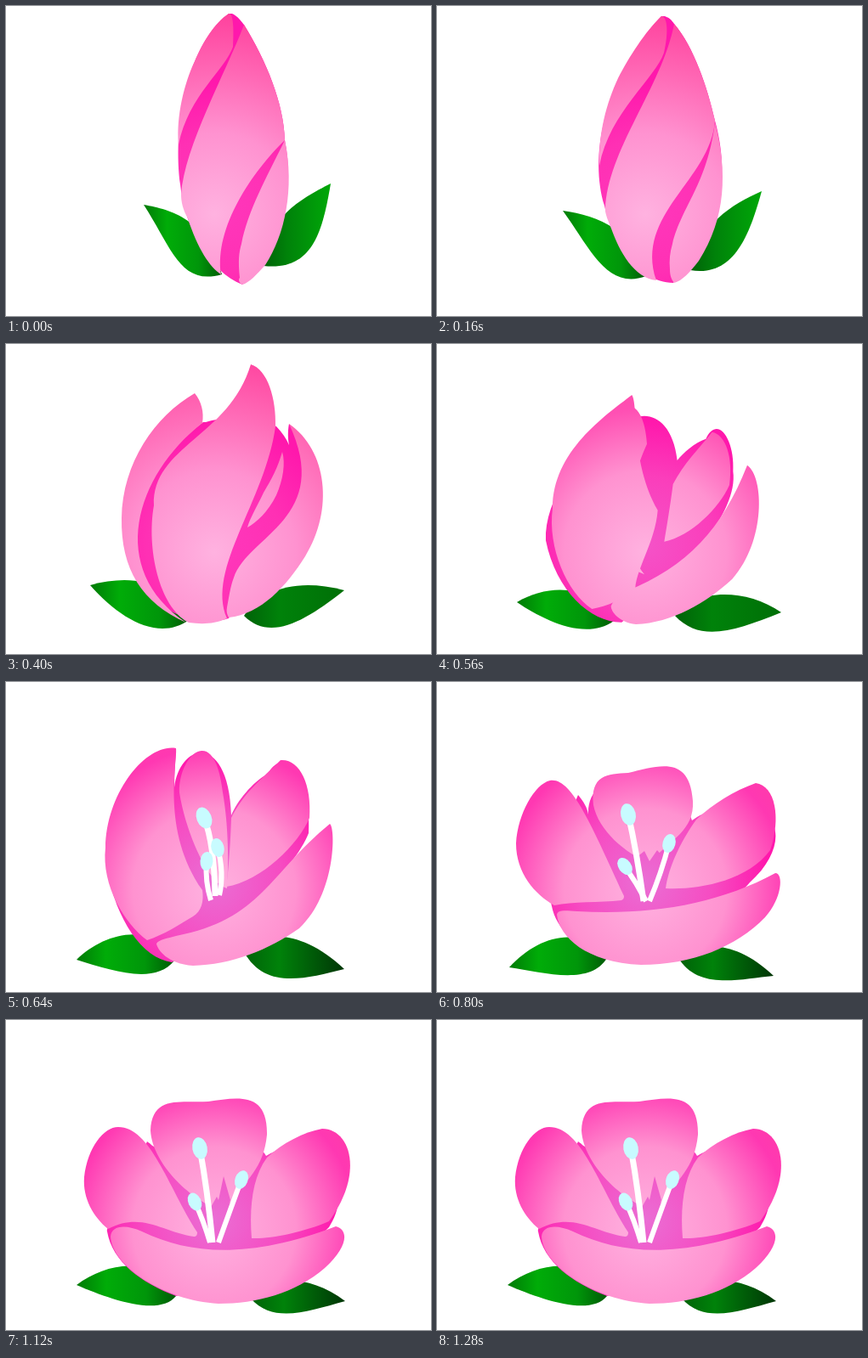
Recreate the animation shown at these times as an HTML page without scripts. Size 500 by 365 pixels, loop 1.44 s.

```html
<!DOCTYPE html>
<html lang="en">
<head>
<meta charset="utf-8">
<title>Blooming flower</title>
<style>
html, body { margin: 0; width: 100%; height: 100%; overflow: hidden; background: #fff; }
svg { display: block; width: 100vw; height: 100vh; }

/* Poses are joined by steps of 80 ms: two per segment unless a keyframe says otherwise. */
path, stop, #stamens { animation: 1.44s steps(2) infinite; }
.stem { fill: none; stroke: #fff; stroke-width: 6; marker-start: url(#head); }
.petal { fill: url(#pink); }
.dark { fill: url(#magenta); }
.tint { animation-name: tint; }
.glow { animation-name: glow; }
.halo { animation-name: halo; }
.shade { animation-name: shade; }
#leafL { animation-name: leafL; fill: url(#greenL); }
#leafR { animation-name: leafR; fill: url(#greenR); }
#base { animation-name: base; }
#back { animation-name: back; }
#right { animation-name: right; }
#crown { animation-name: crown; }
#stamens { animation-name: reveal; }
#stemA { animation-name: stemA; stroke-width: 7; }
#stemB { animation-name: stemB; }
#stemC { animation-name: stemC; }
#left { animation-name: left; }
#front { animation-name: front; }

@keyframes tint {
  0%, 27.77% { stop-color: #ff68b5; }
  44.44%, 100% { stop-color: #ff38b2; }
}
@keyframes glow {
  0%, 27.77% { stop-color: #ff38bc; }
  44.44%, 100% { stop-color: #ea6ed4; }
}
@keyframes halo {
  0%, 27.77% { stop-color: #ff30b4; }
  44.44%, 100% { stop-color: #f64cc2; }
}
@keyframes shade {
  0%, 11.11% { stop-color: #00a808; }
  44.44%, 100% { stop-color: #003606; }
}
@keyframes reveal {
  0%, 44.43% { opacity: 0; }
  44.44%, 100% { opacity: 1; }
}
@keyframes leafL {
  0% { d: path("M162 234C195 240 235 250 254 316C205 330 195 285 162 234Z"); }
  11.11% { d: path("M148 241C190 247 235 265 246 318C200 335 180 285 148 241Z"); animation-timing-function: steps(3); }
  27.77% { d: path("M99 284C150 270 195 280 215 325C180 350 135 325 99 284Z"); }
  38.88% { d: path("M94 304C135 280 185 285 208 326C175 350 125 325 94 304Z"); animation-timing-function: steps(1); }
  44.44% { d: path("M83 327C115 295 175 280 198 328C175 357 125 340 83 327Z"); }
  55.55% { d: path("M85 336C120 298 170 285 200 325C180 358 125 342 85 336Z"); }
  66.66% { d: path("M85 329C120 295 170 283 200 327C180 354 125 338 85 329Z"); }
  77.77%, 100% { d: path("M83 312C120 285 175 275 200 325C180 350 120 328 83 312Z"); }
}
@keyframes leafR {
  0% { d: path("M382 209C345 228 305 250 303 306C360 312 372 268 382 209Z"); }
  11.11% { d: path("M382 218C345 235 310 255 298 311C350 320 368 268 382 218Z"); animation-timing-function: steps(3); }
  27.77% { d: path("M398 290C340 275 300 290 280 320C310 350 350 328 398 290Z"); }
  38.88% { d: path("M405 316C360 285 300 290 280 320C310 352 350 338 405 316Z"); animation-timing-function: steps(1); }
  44.44% { d: path("M398 338C350 292 300 290 280 318C305 362 350 350 398 338Z"); }
  55.55% { d: path("M396 346C350 302 305 305 286 328C310 362 355 350 396 346Z"); }
  66.66% { d: path("M397 344C350 298 305 300 288 328C310 362 355 350 397 344Z"); }
  77.77%, 100% { d: path("M399 331C355 298 305 300 288 328C315 358 355 343 399 331Z"); }
}
@keyframes base {
  0% { d: path("M262 9C263 9 264 9 265 9C266 9 267 9 268 10C272 12 277 18 280 22C306 64 327 115 328 158C340 215 325 285 278 328C240 313 210 262 205 210C197 150 209 50 262 9Z"); }
  11.11% { d: path("M264 12C265 12 266 12 267 12C268 12 269 12 270 13C274 14 277 18 279 21C302 48 318 95 327 135C345 200 336 270 278 326C235 326 204 270 197 235C180 180 193 90 264 12Z"); animation-timing-function: steps(3); }
  27.77% { d: path("M232 92C233 92 234 92 235 92C255 85 300 85 318 97C325 104 330 112 333 119C331 108 332 99 333 94C385 155 350 215 262 323C225 335 160 315 146 250C138 190 178 130 232 92Z"); animation-timing-function: steps(3); }
  44.44% { d: path("M200 79C199 95 198 110 198 124C205 70 262 60 265 157C272 140 290 118 308 108C330 70 360 120 356 178C340 220 260 300 195 330C160 325 130 280 119 222C120 180 160 130 200 79Z"); }
  55.55% { d: path("M166 133C172 140 177 148 178 156C176 90 285 110 300 163C308 157 316 154 325 150C405 130 420 190 368 236C340 270 250 310 200 325C165 315 140 290 135 264C128 240 150 170 166 133Z"); }
  66.66% { d: path("M167 149C168 150 170 151 171 152C185 165 290 125 315 163C320 160 325 159 330 158C390 150 425 200 370 254C340 290 250 320 200 325C160 310 125 285 120 250C140 225 150 180 167 149Z"); }
  77.77%, 100% { d: path("M166 143C167 144 169 145 170 146C185 165 285 120 306 160C312 156 320 153 328 150C380 130 410 200 380 244C340 285 250 315 200 325C160 310 125 285 119 249C118 240 150 180 166 143Z"); }
}
@keyframes back {
  0% { d: path("M262 9C268 8 268 30 267 48C258 75 215 105 203 163C200 130 210 90 222 65C232 42 245 20 262 9Z"); }
  11.11% { d: path("M264 12C272 12 272 35 267 55C257 85 203 125 191 188C190 150 199 115 213 85C226 60 245 30 264 12Z"); animation-timing-function: steps(3); }
  27.77% { d: path("M222 58C230 68 233 80 231 93C152 155 118 265 212 328C160 305 135 265 136 205C137 140 175 85 222 58Z"); animation-timing-function: steps(3); }
  44.44% { d: path("M230 81C245 80 252 105 255 130C262 170 262 215 260 243C235 235 210 170 204 130C203 108 215 82 230 81Z"); }
  55.55% { d: path("M225 107C260 99 297 85 301 140C303 175 275 185 250 213C222 202 190 175 184 145C180 110 200 108 225 107Z"); }
  66.66% { d: path("M225 115C262 108 312 80 316 140C315 180 280 185 250 217C215 205 172 175 169 145C168 110 195 117 225 115Z"); }
  77.77%, 100% { d: path("M238 96C270 92 308 82 307 135C303 175 285 185 256 225C220 215 172 170 170 130C172 88 205 98 238 96Z"); }
}
@keyframes right {
  0%, 11.11% { d: path("M300 170C302 180 298 195 290 200C285 205 283 207 278 210C285 200 290 190 292 188C296 180 298 175 300 170Z"); animation-timing-function: steps(3); }
  27.77% { d: path("M325 127C329 140 326 160 318 178C308 198 295 210 284 216C287 205 295 192 303 175C312 160 320 145 325 127Z"); animation-timing-function: steps(3); }
  44.44% { d: path("M323 92C345 90 360 120 357 160C345 190 300 235 259 241C262 220 264 190 265 160C280 130 300 115 323 92Z"); }
  55.55% { d: path("M375 119C398 122 405 160 392 198C365 235 305 245 269 243C272 220 285 190 305 162C325 143 350 128 375 119Z"); }
  66.66% { d: path("M368 147C420 149 435 195 380 243C345 250 285 250 270 238C268 215 290 190 315 164C333 153 350 147 368 147Z"); }
  77.77%, 100% { d: path("M372 128C405 128 422 180 380 237C350 250 310 258 289 257C286 220 290 185 307 162C325 145 350 132 372 128Z"); }
}
@keyframes crown {
  0%, 44.44% { d: path("M244 245L246 243L248 244L250 243L252 245L248 250Z"); }
  55.55% { d: path("M228 212L244 199L250 211L259 198L266 206L250 235Z"); }
  66.66% { d: path("M235 212L247 204L255 216L264 206L272 205L252 235Z"); }
  77.77%, 100% { d: path("M240 222L248 208L250 212L256 184L264 212L256 235Z"); }
}
@keyframes stemA {
  0%, 44.44% { d: path("M233 160Q245 190 246 252"); }
  55.55% { d: path("M225 156Q235 200 243 258"); }
  66.66% { d: path("M221 158Q232 200 245 258"); }
  77.77%, 100% { d: path("M228 151Q237 200 243 262"); }
}
@keyframes stemB {
  0%, 44.44% { d: path("M236 211Q234 235 241 257"); }
  55.55% { d: path("M221 217Q235 237 246 258"); }
  66.66% { d: path("M213 223Q232 240 244 258"); }
  77.77%, 100% { d: path("M222 214Q232 235 240 262"); }
}
@keyframes stemC {
  0%, 44.44% { d: path("M249 195Q257 225 251 251"); }
  55.55% { d: path("M273 190Q264 225 250 258"); }
  66.66% { d: path("M285 190Q265 220 251 258"); }
  77.77%, 100% { d: path("M277 188Q265 220 250 262"); }
}
@keyframes left {
  0% { d: path("M280 22C306 64 327 115 328 158C290 195 245 260 253 316C240 308 225 285 214 250C208 240 206 230 206 222C210 165 258 80 280 22Z"); }
  11.11% { d: path("M279 21C302 48 318 95 327 135C322 205 232 245 258 323C232 320 215 290 205 262C201 252 198 245 198 240C200 170 265 95 279 21Z"); animation-timing-function: steps(3); }
  27.77% { d: path("M288 24C308 30 318 65 317 97C305 185 235 265 260 323C245 330 230 330 215 328C180 310 165 240 174 190C172 120 262 110 288 24Z"); animation-timing-function: steps(3); }
  44.44% { d: path("M200 78C202 95 182 175 231 245C233 258 230 270 220 276C205 285 185 298 166 304C140 285 112 240 117 195C118 130 165 72 200 78Z"); }
  55.55% { d: path("M133 116C158 112 180 165 220 252C220 255 219 256 217 257C190 260 160 258 138 263C115 250 93 225 93 190C95 155 115 120 133 116Z"); }
  66.66% { d: path("M122 134C160 132 195 180 215 240C214 243 213 244 211 244C180 230 150 232 122 247C100 240 78 220 78 195C80 170 105 132 122 134Z"); }
  77.77%, 100% { d: path("M132 126C170 126 190 195 225 250C225 253 224 255 221 255C185 250 160 225 120 246C103 232 90 210 92 185C96 150 115 126 132 126Z"); }
}
@keyframes front {
  0% { d: path("M328 158C340 215 328 270 305 305C295 316 286 326 278 328C274 326 273 322 275 320C273 300 274 290 277 280C285 240 305 205 328 158Z"); }
  11.11% { d: path("M327 137C342 195 340 250 308 300C298 313 288 324 279 326C276 322 274 318 274 310C273 300 274 290 277 280C288 235 318 210 327 137Z"); animation-timing-function: steps(3); }
  27.77% { d: path("M333 94C378 125 386 195 352 250C330 285 300 318 262 322C260 318 259 315 260 310C262 300 264 285 268 275C285 225 385 205 333 94Z"); animation-timing-function: steps(3); }
  44.44% { d: path("M381 167C388 172 388 250 345 290C310 315 265 333 220 334C190 332 178 315 177 308C180 303 190 302 200 299C300 280 310 225 381 167Z"); }
  55.55% { d: path("M398 225C408 225 406 255 386 277C352 312 300 333 240 333C175 330 144 300 141 274C142 268 150 269 165 270C250 275 330 262 398 225Z"); }
  66.66% { d: path("M386 256C410 260 408 272 385 288C345 318 300 336 240 335C180 330 128 290 127 260C128 244 150 243 176 248C230 268 270 272 386 256Z"); }
  77.77%, 100% { d: path("M388 243C404 247 402 268 375 292C340 322 295 334 250 334C185 330 125 290 123 255C124 242 140 240 160 249C220 278 290 280 388 243Z"); }
}
</style>
</head>
<body>
<svg viewBox="0 0 500 365" preserveAspectRatio="none">
  <defs>
    <radialGradient id="pink" gradientUnits="userSpaceOnUse" cx="245" cy="245" r="240">
      <stop offset="0" stop-color="#ffb2e0"/>
      <stop offset=".4" stop-color="#ff92d0"/>
      <stop offset=".7" class="tint"/>
      <stop offset="1" stop-color="#ff3f9c"/>
    </radialGradient>
    <radialGradient id="magenta" gradientUnits="userSpaceOnUse" cx="245" cy="235" r="145">
      <stop offset="0" class="glow"/>
      <stop offset=".55" class="halo"/>
      <stop offset="1" stop-color="#ff18ac"/>
    </radialGradient>
    <linearGradient id="greenL">
      <stop offset="0" stop-color="#007a06"/>
      <stop offset=".3" stop-color="#00ac08"/>
      <stop offset=".7" stop-color="#00960a"/>
      <stop offset="1" stop-color="#005a06"/>
    </linearGradient>
    <linearGradient id="greenR">
      <stop offset="0" stop-color="#006208"/>
      <stop offset=".35" stop-color="#00820a"/>
      <stop offset="1" class="shade"/>
    </linearGradient>
    <marker id="head" orient="auto" overflow="visible">
      <ellipse rx="1.85" ry="1.25" fill="#c8fbff"/>
    </marker>
  </defs>
  <path id="leafL"/>
  <path id="leafR"/>
  <path id="base" class="dark"/>
  <path id="back" class="petal"/>
  <path id="right" class="petal"/>
  <path id="crown" class="dark"/>
  <path id="left" class="petal"/>
  <g id="stamens">
    <path id="stemA" class="stem"/>
    <path id="stemB" class="stem"/>
    <path id="stemC" class="stem"/>
  </g>
  <path id="front" class="petal"/>
</svg>
</body>
</html>
```
